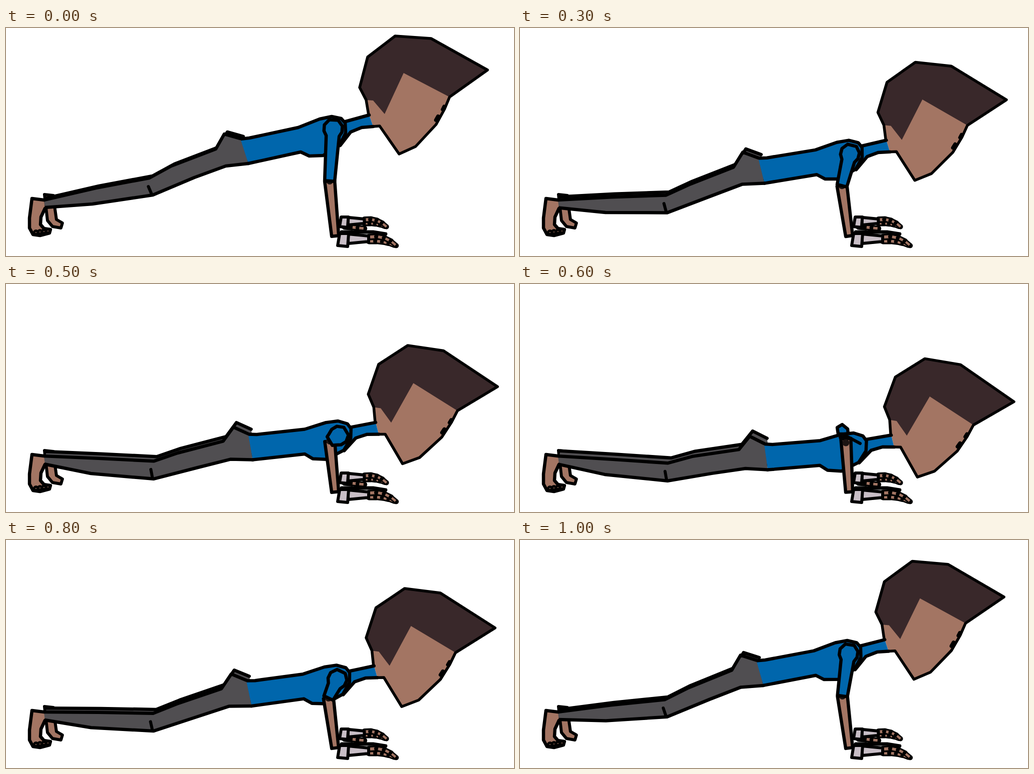
Recreate the animation shown at these times as an HTML page. Size 1017 px wide and 456 px high, loop 1100 ms.

```html
<!DOCTYPE html>
<html lang="en">
<head>
<meta charset="utf-8">
<title>Push-up</title>
<style>
html, body { margin: 0; width: 100%; height: 100%; overflow: hidden; background: #fff; }
svg { display: block; width: 100%; height: 100%; }
path, circle { stroke-linejoin: round; vector-effect: non-scaling-stroke; }
</style>
</head>
<body>
<svg id="stage" viewBox="0 0 1017 456"></svg>
<script>
const stage = document.getElementById('stage');
const SKIN = '#a37563', HAIR = '#39282a', BLUE = '#0066ac', GREY = '#504e51', GLOVE = '#c8bec6', INK = '#000';

function add(tag, attrs, parent = stage) {
  const el = document.createElementNS('http://www.w3.org/2000/svg', tag);
  for (const key in attrs) el.setAttribute(key, attrs[key]);
  return parent.appendChild(el);
}
const pairs = list => Array.from({ length: list.length / 2 }, (_, i) => [list[2 * i], list[2 * i + 1]]);
const trace = pts => 'M' + pts.map(p => p.map(v => v.toFixed(1)).join(' ')).join('L');
const shape = (fill, width = 6.5, parent = stage) =>
  add('path', { fill, stroke: width ? INK : 'none', 'stroke-width': width, 'stroke-linecap': 'round' }, parent);

function still(fill, width, list, close = 'Z', parent = stage) {
  const el = shape(fill, width, parent);
  el.setAttribute('d', trace(pairs(list)) + close);
  return el;
}

// Body parts are given in the raised pose; edges are inked, the gaps between them are not.
const parts = [];
function part(fill, width, ...edges) {
  const part = { area: shape(fill, 0), line: shape('none', width), edges: edges.map(pairs) };
  parts.push(part);
  return part;
}

// One finger: a chain of shrinking joints that bends by the same angle each time.
function finger(x, y, count, length, angle, curl, parent) {
  for (let i = 0; i < count; i++, angle += curl, length *= 0.95) {
    const x2 = x + length * Math.cos(angle), y2 = y + length * Math.sin(angle);
    const d = trace([[x, y], [x2, y2]]);
    add('path', { d, stroke: INK, 'stroke-width': 13 - i, 'stroke-linecap': 'round' }, parent);
    add('path', { d, stroke: SKIN, 'stroke-width': 6 - i / 2, 'stroke-dasharray': `0 2 ${length - 4} 9` }, parent);
    [x, y] = [x2, y2];
  }
}

function hand(x, y, scale) {
  const g = add('g', { transform: `translate(${x} ${y}) scale(${scale})` });
  finger(59, 15, 4, 14, 0, 0.12, g);
  finger(59, 7, 4, 16, -0.05, 0.25, g);
  still(GLOVE, 6, [17, 1, 58, 5, 58, 16, 17, 20], 'Z', g);
  still(GLOVE, 6, [0, 0, 18, 0, 16, 26, -4, 24], 'Z', g);
}

// far side
still(SKIN, 6, [77,333, 95,335, 98,362, 101,383, 113,390, 110,400, 93,397, 83,385]);
finger(678, 397, 3, 14, 0.1, 0, stage);
hand(671, 378, 0.8);

const LEG = [
  [76,344, 180,320, 287,300, 331,276, 420,242, 437,212, 469,221],
  [485,271, 440,276, 377,299, 294,334, 173,352, 78,359]
];
const farLeg = part(GREY, 6.5, ...LEG);
const farCap = still(BLUE, 6.5, [637,300, 635,287, 645,281, 656,290, 657,300]);

// head and neck
const crown = [721,144, 708,119, 724,58, 779,16, 851,21, 964,84, 888,138];
part(SKIN, 0, [727,174, ...crown, 861,193, 820,237, 787,252, 748,196, 735,197]);
part(HAIR, 0, [...crown, 796,90, 758,172, 735,145]);
part('none', 5.5, [726,174, ...crown, 878,162, 861,193, 820,237, 787,252, 748,196, 735,197]);
part('none', 7, [877,157, 874,163]);
part('none', 8, [865,177, 861,184]);
part(BLUE, 6.5, [676,188, 727,174], [735,197, 712,199, 690,208, 669,235]);

// trunk and near leg
part(BLUE, 6.5, [469,222, 487,220, 585,199, 628,182, 652,177, 671,181, 679,190, 680,210,
  668,234, 635,255, 607,256, 590,248, 485,271]);
part(GREY, 6.5, ...LEG);
part('none', 6, [285,317, 291,331]);

// near foot
still(SKIN, 6.5, [78,361, 70,378, 69,393, 76,401, 89,403, 87,410, 68,415, 54,413, 47,400, 47,380, 52,341, 76,344], '');
for (let i = 0; i < 4; i++) add('circle', { cx: 60 + 8 * i, cy: 409 - i, r: 3.5, fill: SKIN, stroke: INK, 'stroke-width': 5 });

// near arm
const forearm = shape(SKIN);
const elbowPatch = add('circle', { r: 7, fill: '#1c1412' });
const upperArm = shape(BLUE);
const armLine = still('none', 6, [641,307, 655,305, 681,319], '');
hand(668, 411, 1);
still('none', 7, [672,408, 735,408, 760,412], '');

// The trunk bends like a shallow parabola over the ankles and stays stiff past the shoulders.
const ANKLE = 77, BEND = 0.000206, STEEP = 0.317, STIFF = 0.092;
function lower([x, y], q) {
  const u = Math.max(0, x - ANKLE), bent = Math.min(u, (STEEP - STIFF) / (2 * BEND));
  const slope = STEEP - 2 * BEND * bent;
  const drop = (STEEP - BEND * bent) * bent + STIFF * (u - bent);
  // knees sink sooner than the trunk
  const lead = Math.max(0, Math.min(1, (430 - x) / 130));
  const amount = q + lead * 0.75 * q * (1 - q);
  return [x + slope * (340 - y) * amount, y + drop * amount];
}

// A limb of varying thickness: each station is [distance along, half width].
function limb([x, y], [x2, y2], stations) {
  const length = Math.hypot(x2 - x, y2 - y), ax = (x2 - x) / length, ay = (y2 - y) / length;
  const side = s => stations.map(([t, w]) => [x + ax * t * length - ay * w * s, y + ay * t * length + ax * w * s]);
  return trace([...side(1), ...side(-1).reverse()]) + 'Z';
}

function pose(q) {
  for (const { area, line, edges } of parts) {
    const moved = edges.map(edge => edge.map(p => lower(p, q)));
    area.setAttribute('d', trace(moved.flat()));
    line.setAttribute('d', moved.map(trace).join(''));
  }
  for (const el of [farLeg.area, farLeg.line]) el.setAttribute('transform', `translate(6 ${-4 - 6 * q})`);

  const shoulder = lower([655, 201], q * 1.05);
  const elbow = [648 - 16 * q + 19 * q * q, 306 + 5 * q + 30 * q * (1 - q)];
  const reach = Math.hypot(elbow[0] - shoulder[0], elbow[1] - shoulder[1]);
  forearm.setAttribute('d', limb(elbow, [659, 416], [[0, 10], [1, 7]]));
  upperArm.setAttribute('d', limb(shoulder, elbow, [[-17 / reach, 9], [-6 / reach, 18], [6 / reach, 18], [15 / reach, 13], [1, 10]]));

  // fully bent, the sleeve points away from the viewer
  const low = q > 0.9;
  elbowPatch.setAttribute('cx', elbow[0]);
  elbowPatch.setAttribute('cy', elbow[1] + (low ? 8 : 0));
  upperArm.style.display = low ? 'none' : '';
  farCap.style.display = armLine.style.display = low ? '' : 'none';
}

// Fourteen-step cycle, eased down and up, shown at uneven steps.
const ease = t => t * t * (3 - 2 * t);
let shown = -1;
function draw(ms) {
  const slot = Math.max(0, Math.floor(ms % 1100 / 100) - 1);
  if (slot === shown) return;
  shown = slot;
  const step = Math.floor(slot * 1.4 + 0.3);
  pose(ease(1 - Math.abs(7 - step) / 7) / 0.945);
}
const start = performance.now();
function tick() {
  draw(performance.now() - start);
  requestAnimationFrame(tick);
}
tick();
</script>
</body>
</html>
```
